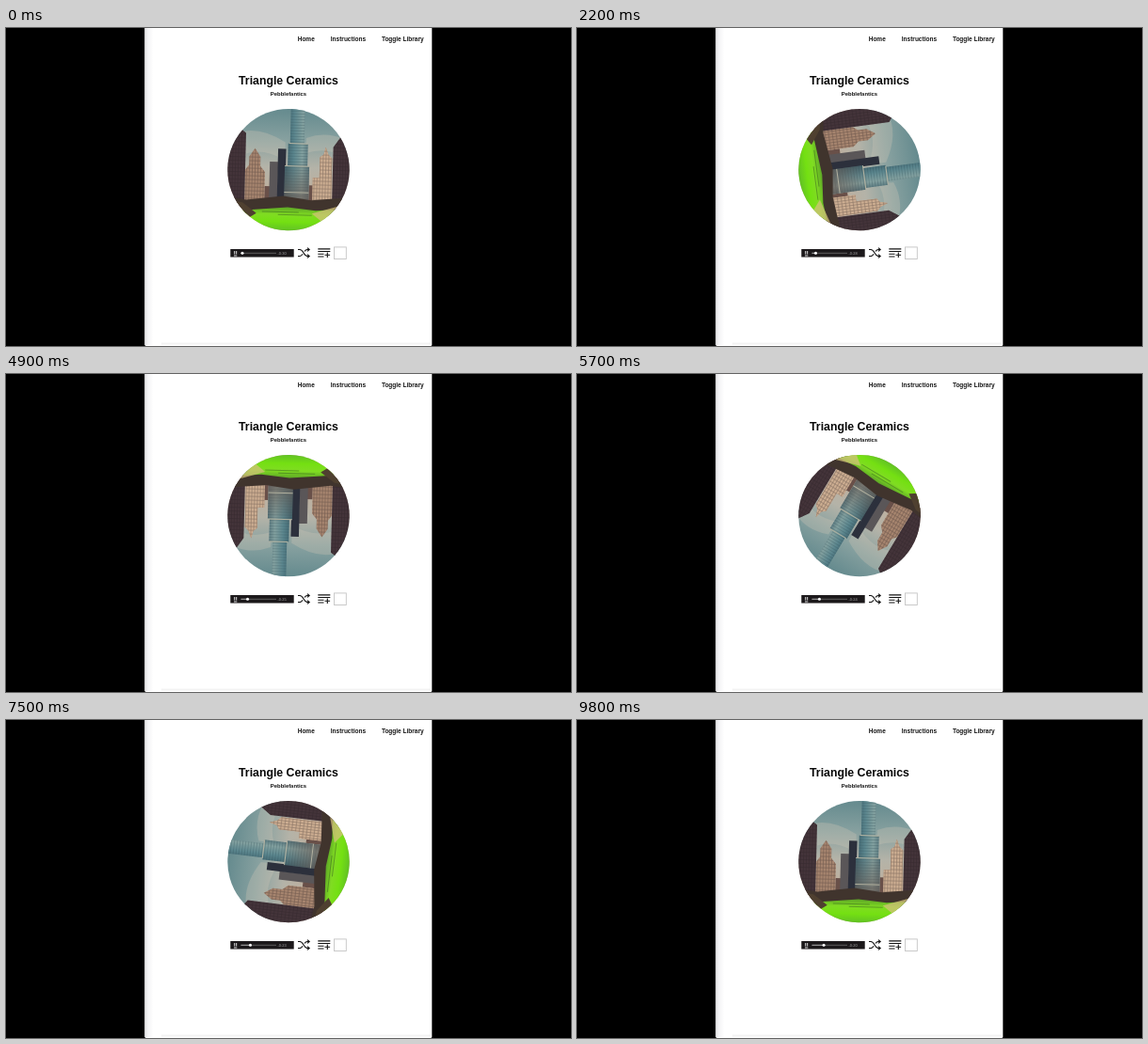
An HTML page for the animation above (9900 ms loop, 600 by 338 pixels).

```html
<!DOCTYPE html>
<html lang="en">
<head>
<meta charset="utf-8">
<title>Music player</title>
<style>
  html, body { margin: 0; height: 100%; overflow: hidden; background: #000; }
  svg { display: block; width: 600px; height: 338px; }
  text { font: bold 6.5px "Liberation Sans", Arial, sans-serif; fill: #151515; }
  .title { font-size: 12.3px; text-anchor: middle; fill: #080808; }
  .artist { font-size: 5.9px; text-anchor: middle; }
  #time { font-size: 4px; font-weight: normal; fill: #a5a5a5; }
  .icon { fill: none; stroke: #111; stroke-width: 1.1; }
</style>
</head>
<body>
<svg viewBox="0 0 600 338">
  <defs>
    <clipPath id="disc"><circle r="64.7"/></clipPath>
    <linearGradient id="edge">
      <stop stop-color="#e2e2e4"/><stop offset=".35" stop-color="#f3f3f5"/><stop offset="1" stop-color="#fff"/>
    </linearGradient>
    <linearGradient id="sky" x2="0" y2="1">
      <stop stop-color="#648a8e"/><stop offset=".25" stop-color="#86a09f"/>
      <stop offset=".48" stop-color="#b4b3a8"/><stop offset=".8" stop-color="#c4ad98"/>
    </linearGradient>
    <linearGradient id="glass">
      <stop stop-color="#3c606b"/><stop offset=".35" stop-color="#5b868e"/>
      <stop offset=".7" stop-color="#82a09f"/><stop offset="1" stop-color="#52727a"/>
    </linearGradient>
    <linearGradient id="haze" x2="0" y2="1">
      <stop offset=".55" stop-color="#6d5b52" stop-opacity="0"/><stop offset="1" stop-color="#6d5b52" stop-opacity=".75"/>
    </linearGradient>
    <linearGradient id="river" x2="0" y2="1">
      <stop stop-color="#5da626"/><stop offset=".3" stop-color="#80dc22"/>
      <stop offset=".6" stop-color="#74e012"/><stop offset="1" stop-color="#5fbd27"/>
    </linearGradient>
    <pattern id="windows" width="3" height="4" patternUnits="userSpaceOnUse">
      <path d="M.6 0V4M0 3.4H3" stroke="#241b20" stroke-width=".7" opacity=".4"/>
    </pattern>
    <pattern id="floors" width="4" height="3" patternUnits="userSpaceOnUse">
      <path d="M0 .5H4" stroke="#27474f" stroke-width=".6" opacity=".4"/>
    </pattern>
    <path id="tower" d="M-4 36V-4H-1V-28H1V-65H16V-28H20V-4H22V36Z"/>
    <path id="sides" d="M-66 42V-51L-58-47-46-38V42ZM47 42V-25L60-44 66-48V42Z"/>
    <path id="stone" d="M-46 38V1L-42-4V-13L-36-22-30-13V-3L-25 3V38ZM26 39V8H33V-14L37-17 39-25 42-17 46-13V39Z"/>
  </defs>

  <rect x="147.4" y="-4" width="304.9" height="341.9" rx="1.5" fill="#fff"/>
  <rect x="147.4" y="0" width="9" height="337" fill="url(#edge)"/>
  <path d="M165 335.5H451" stroke="#f3f3f3" stroke-width="2"/>

  <text x="309.7" y="14.2">Home</text>
  <text x="344.8" y="14.2">Instructions</text>
  <text x="398.9" y="14.2">Toggle Library</text>
  <text class="title" x="300" y="60.4">Triangle Ceramics</text>
  <text class="artist" x="300" y="71.8">Pebblefantics</text>

  <g transform="translate(300 150.6)">
    <g id="cover" clip-path="url(#disc)">
      <rect x="-65" y="-65" width="130" height="130" fill="url(#sky)"/>
      <path d="M-55-38Q-32-46-4-29V-10Q-30-24-50-14ZM18-34Q38-42 58-34V-15Q40-26 18-18Z" fill="#d2c7b6" opacity=".3"/>
      <path d="M-25 38V18H-8V38ZM22 38V16H32V38Z" fill="#695049"/>
      <path d="M-20 36V-8H-11V36Z" fill="#5a5658"/>
      <path d="M-11.5 36V-22H-3V36Z" fill="#2c303c"/>
      <use href="#tower" fill="url(#glass)"/>
      <use href="#tower" fill="url(#floors)"/>
      <use href="#tower" fill="url(#haze)"/>
      <path d="M0-28H20M-4-4H22M-4 24H22" stroke="#b3b2a0"/>
      <use href="#stone" fill="#a98770"/>
      <path d="M26 39V8H33V-14L37-17 39-25 42-17 46-13V39Z" fill="#cfb093"/>
      <use href="#sides" fill="#44343a"/>
      <use href="#stone" fill="url(#windows)"/>
      <use href="#sides" fill="url(#windows)"/>
      <path d="M-66 30L-44 33-5 28 25 32 66 28V49H-66Z" fill="#40342d"/>
      <path d="M-66 46L-34 43 0 40 30 43 66 40V66H-66Z" fill="url(#river)"/>
      <path d="M-66 34L-48 36-33 47-44 54-66 58Z" fill="#4f4030"/>
      <path d="M26 46L66 34V58L36 54Z" fill="#d2c279" opacity=".75"/>
      <path d="M-27 45H12M-10 48H26" stroke="#3c6c20" opacity=".55"/>
    </g>
  </g>

  <rect x="238.3" y="235" width="67.4" height="8.5" fill="#1c191b"/>
  <path d="M242.7 237V240.5M244.7 237V240.5M242 242H245.3" stroke="#ddd"/>
  <path d="M249.5 239.3H287" stroke="#666" stroke-width=".9"/>
  <path id="played" stroke="#aaa" stroke-width=".9"/>
  <circle id="thumb" cy="239.3" r="1.5" fill="#fff"/>
  <text id="time" x="288.5" y="240.8"></text>

  <path class="icon" d="M310 235.5H312C316 235.5 316 242.5 320 242.5H322M310 242.5H312C313.5 242.5 314.3 241.5 315 240.3M317 237.5C317.8 236.2 318.6 235.5 320 235.5H322M320 233.6L322.2 235.5 320 237.4M320 240.6L322.2 242.5 320 244.4"/>
  <path class="icon" d="M331.3 234.9H344.3M331.3 237.5H344.3M331.3 240.3H337.5M331.3 243H337.5M338.5 241.2H344.1M341.3 238.5V244"/>
  <rect x="348.5" y="232.9" width="12.8" height="12.6" fill="#fff" stroke="#c4c4c4" stroke-width=".9"/>
</svg>
<script>
  const LOOP = 9900, STEP = 100, TURN = 9800, START_ANGLE = 1.5;
  const el = id => document.getElementById(id);

  function draw(now) {
    const ms = Math.floor(now % LOOP / STEP) * STEP;
    const x = 251 + ms / 1000 * 1.13;
    el('cover').setAttribute('transform', `rotate(${START_ANGLE + ms / TURN * 360})`);
    el('thumb').setAttribute('cx', x);
    el('played').setAttribute('d', `M249.5 239.3H${x}`);
    el('time').textContent = '-0:' + Math.round(30 - ms / 1000);
    requestAnimationFrame(draw);
  }
  draw(performance.now());
</script>
</body>
</html>
```
